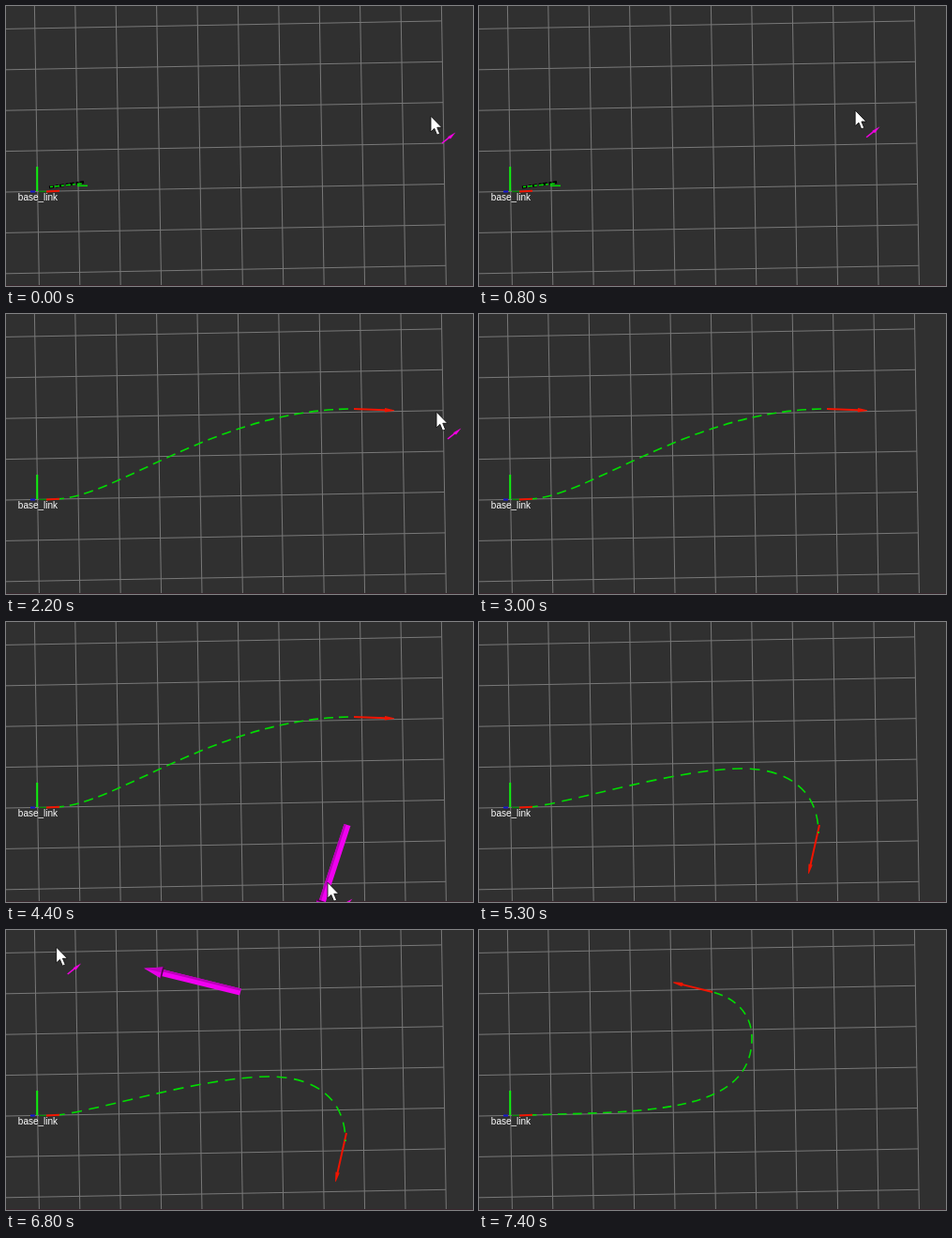
Write an HTML page that moves like this. It is 498 px wide and 298 px high and loops after 8 s.

```html
<!DOCTYPE html>
<html lang="en">
<head>
<meta charset="utf-8">
<title>Path planning view</title>
<style>
  html, body { margin: 0; width: 100%; height: 100%; overflow: hidden; background: #303030; }
  svg { display: block; width: 498px; height: 298px; }
  text { font: 10px "Liberation Sans", Arial, sans-serif; fill: #fff; }
  .grid { stroke: #787878; stroke-width: 1; }
  .route { fill: none; stroke: #00dc00; stroke-width: 1.6; }
  .heading { fill: #f01400; }
</style>
</head>
<body>
<svg viewBox="0 0 498 298">
  <rect width="498" height="298" fill="#303030"/>
  <g id="grid" class="grid"></g>
  <rect y="297" width="498" height="1" fill="#38282e"/>

  <g id="scan" fill="none">
    <path d="M46 193L83 187.5" stroke="#000" stroke-width="3" stroke-dasharray="5 2 3 1"/>
    <path d="M47 192.5L82 189" stroke="#00dc00" stroke-width="1.5" stroke-dasharray="3 2 5 2"/>
    <path d="M76 191.3H87" stroke="#00dc00" stroke-width="1.5"/>
  </g>
  <g id="routes"></g>

  <g fill="none">
    <path d="M26 197.5H31" stroke="#1818d0" stroke-width="2"/>
    <path d="M35 197.4H44" stroke="#0a8a0a" stroke-width="1.4"/>
    <path d="M43 197.6L57 196.8" stroke="#f01400" stroke-width="2"/>
    <path d="M33.2 171V197" stroke="#10ee10" stroke-width="2"/>
  </g>
  <text x="34" y="207" text-anchor="middle">base_link</text>

  <g id="goal">
    <rect y="-3.6" width="87" height="7.2" fill="#f000f0"/>
    <rect y="1.4" width="87" height="2.2" fill="#b800b8"/>
    <path d="M86 -6.2L106 0 86 6.2Z" fill="#e800e8"/>
    <path d="M86 0L106 0 86 6.2Z" fill="#c000c0"/>
    <path d="M86 -6.2V6.2" stroke="#50004c" stroke-width="1.6"/>
  </g>

  <g id="pointer">
    <path d="M12 29L20 22.6" stroke="#f000e0" stroke-width="1.6"/>
    <path d="M18 22.2L26.4 17.4 21 24.6Z" fill="#f000e0"/>
    <path d="M0 .2V17L3.8 13.4 6.6 20.2 9.6 18.9 6.8 12.3H11.8Z" fill="#fff" stroke="#111" stroke-width=".9"/>
  </g>
</svg>
<script>
const LOOP = 8000, TICK = 100, CELL = 43.4;
const $ = id => document.getElementById(id);

function add(parent, tag, attrs) {
  const el = document.createElementNS("http://www.w3.org/2000/svg", tag);
  for (const k in attrs) el.setAttribute(k, attrs[k]);
  return parent.appendChild(el);
}
const line = (x1, y1, x2, y2) => add($("grid"), "line", { x1, y1, x2, y2 });

for (let i = 0; i <= 10; i++) line(30.4 + i * CELL, 0, 35.4 + i * CELL, 298);
for (let j = 0; j < 7; j++) {
  const y = 24.4 + j * CELL;
  line(0, y, 464.6 + j * 0.72, y - 8.5);
}

// Each gesture: pointer visit, drag of a goal arrow from its tail, planned route.
// A glide is [start, end, x, y], moving on from the previous point.
const GESTURES = [
  {
    enter: 0, leave: 3000, from: [453, 117],
    glides: [
      [0, 100, 464, 158], [200, 400, 425.5, 119], [500, 1100, 393, 108], [1200, 1400, 360, 98],
      [1500, 1600, 426, 97], [1600, 1800, 459, 104], [2500, 2700, 334, 81], [2800, 2900, 256, 30]
    ],
    drag: 1600, drop: 2100, tail: [360, 100.4],
    route: "M52 197C116 197 224 101 371 101", dash: "10 6", head: [371, 101, 43]
  },
  {
    enter: 3900, leave: 5300, from: [385, 122],
    glides: [
      [3900, 4200, 364, 214], [4200, 4400, 343, 277], [4400, 4600, 350, 274],
      [4800, 4900, 361, 272], [5000, 5200, 388, 153]
    ],
    drag: 4300, drop: 4800, tail: [364, 216],
    route: "M52 197C80 197 209 156 280 156C333 156 362 182 362 225", dash: "11 7.5", head: [363, 216, 53]
  },
  {
    enter: 6200, leave: 7400, from: [237, 32],
    glides: [
      [6200, 6300, 244, 80], [6400, 6500, 261, 74], [6500, 6600, 251, 66],
      [6600, 6900, 29, 12], [7000, 7100, 124, 18], [7200, 7300, 73, 15]
    ],
    drag: 6700, drop: 6900, tail: [250, 66],
    route: "M52 197C170 193 291 198 291 115C291 88 272 72 249 66", dash: "9.5 6.5", head: [249, 66, 43]
  }
];

const easeOut = p => 1 - (1 - p) ** 2;

function pointerAt(g, t) {
  let [x, y] = g.from;
  for (const [start, end, toX, toY] of g.glides) {
    if (t <= start) break;
    const p = easeOut(Math.min(1, (t - start) / (end - start)));
    x += (toX - x) * p;
    y += (toY - y) * p;
  }
  return [x, y];
}

function aim(g, t) {
  const [x, y] = pointerAt(g, t), [tx, ty] = g.tail;
  return Math.atan2(y - ty, x + 1 - tx) * 180 / Math.PI;
}

const show = (el, on) => el.style.display = on ? "" : "none";
const place = (el, [x, y], deg = 0) =>
  el.setAttribute("transform", `translate(${x} ${y}) rotate(${deg})`);

for (const g of GESTURES) {
  const [x, y, len] = g.head, neck = len - 10;
  g.el = add($("routes"), "g", {});
  const arrow = add(g.el, "path", {
    class: "heading",
    d: `M0 -1H${neck}V-2.2L${len} -.4V.4L${neck} 2.2V1H0Z`
  });
  place(arrow, [x, y], aim(g, g.drop));
  add(g.el, "path", { class: "route", d: g.route, "stroke-dasharray": g.dash });
}

function draw(t) {
  const planned = GESTURES.findLast(g => t > g.drop);
  show($("scan"), !planned);
  for (const g of GESTURES) show(g.el, g === planned);

  const active = GESTURES.find(g => t >= g.enter && t < g.leave);
  const dragging = active && t >= active.drag && t < active.drop;
  show($("pointer"), active);
  show($("goal"), dragging);
  if (active) place($("pointer"), pointerAt(active, t));
  if (dragging) place($("goal"), active.tail, aim(active, t));
}

// The screen refreshes ten times a second.
const start = performance.now();
function tick() {
  const t = (performance.now() - start) % LOOP;
  draw(Math.floor(t / TICK) * TICK);
  requestAnimationFrame(tick);
}
tick();
</script>
</body>
</html>
```
